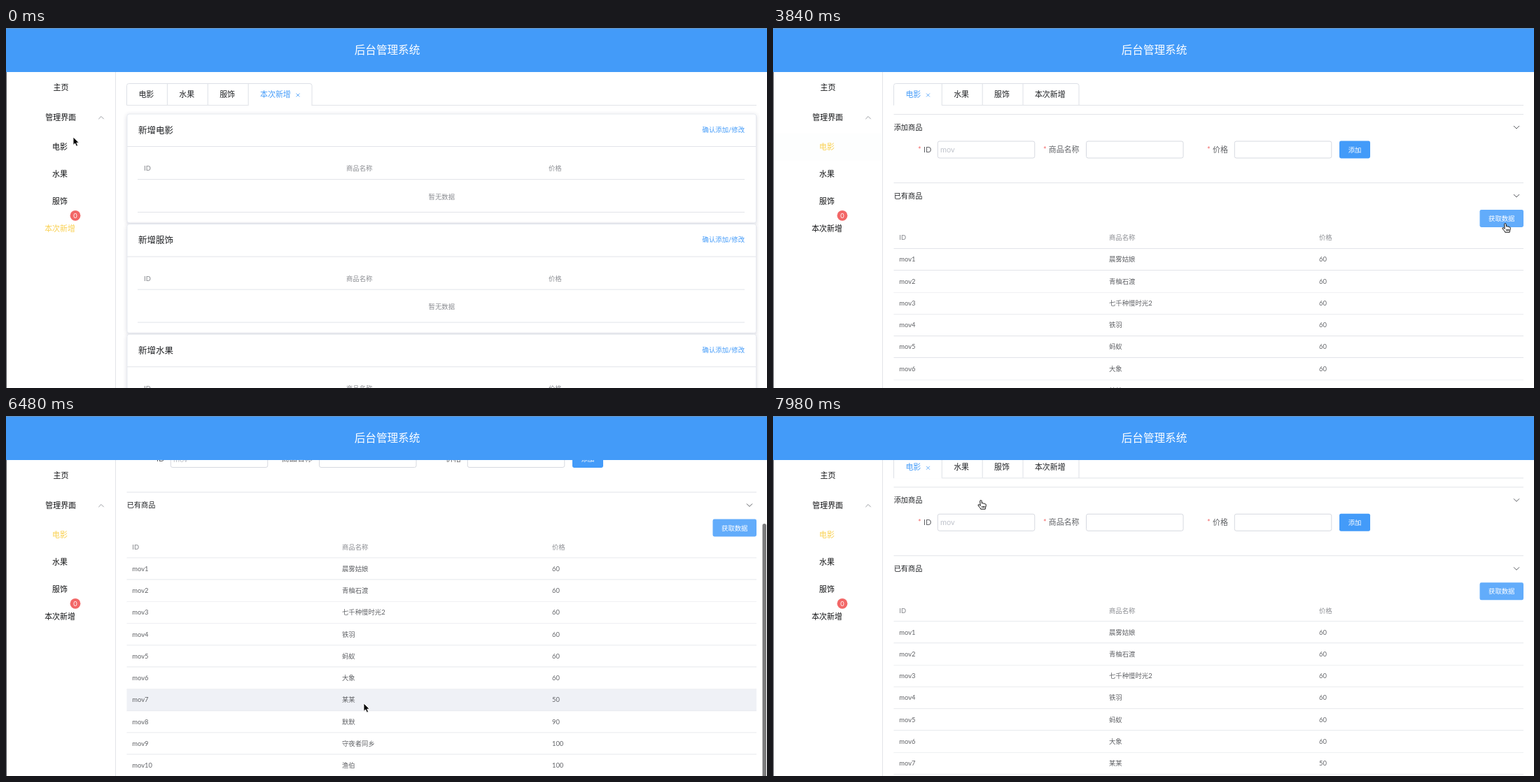
Recreate the animation shown at these times as an HTML page. Size 1087x515 px, loop 8 s.

```html
<!DOCTYPE html>
<html lang="zh-CN">
<head>
<meta charset="utf-8">
<title>后台管理系统</title>
<style>
  html, body { margin: 0; width: 100%; height: 100%; overflow: hidden; background: #fff; }
  svg { display: block; width: 100vw; height: 100vh; }
  text { font-family: Lato, "Noto Sans CJK SC", "Noto Sans CJK", sans-serif; white-space: pre; }
</style>
</head>
<body>
<svg id="stage" viewBox="0 0 1087 515" xmlns="http://www.w3.org/2000/svg"></svg>
<script>
const LOOP = 8000, STEP = 60;
const BLUE = '#439bf9', BLUE_HOVER = '#62acfb', INK = '#1f2124', BODY = '#606266',
      GREY = '#8b8d92', LINE = '#e2e4e9', YELLOW = '#f9d04f', RED = '#f26767';
const SMALL = 9.375, MEDIUM = 10.94;
const ROW_TOP = 315.6, ROW_H = 31.25;
const CLICK_MENU = 600, CLICK_FETCH = 3600, DATA_AT = 3720;

const svg = document.getElementById('stage');

function el(parent, tag, attrs, content) {
  const node = document.createElementNS('http://www.w3.org/2000/svg', tag);
  for (const key in attrs) node.setAttribute(key, attrs[key]);
  if (content !== undefined) node.textContent = content;
  parent.appendChild(node);
  return node;
}
const group = (parent, attrs = {}) => el(parent, 'g', attrs);

// cy is the optical middle of the glyphs
function label(parent, str, x, cy, size, fill, more = {}) {
  return el(parent, 'text', { x, y: cy + size * 0.375, 'font-size': size, fill, ...more }, str);
}
const MID = { 'text-anchor': 'middle' };
const STRONG = { 'font-weight': 500 };

function box(parent, x, y, width, height, fill, more = {}) {
  return el(parent, 'rect', { x, y, width, height, fill, ...more });
}
const rule = (parent, x1, x2, y) => box(parent, x1, y, x2 - x1, 1, LINE);

function stroke(parent, d, color, width = 1) {
  return el(parent, 'path', { d, fill: 'none', stroke: color, 'stroke-width': width });
}

function button(parent, x, y, w, h, str) {
  const face = box(parent, x, y, w, h, BLUE, { rx: 2.4 });
  label(parent, str, x + w / 2, y + h / 2, SMALL, '#fff', { ...MID, ...STRONG });
  return face;
}

function tabs(parent, active) {
  rule(parent, 172.5, 1072, 110);
  let x = 172.5;
  el(parent, 'path', {
    d: 'M172.5 110.5V82.5a3 3 0 0 1 3 -3H434a3 3 0 0 1 3 3V110.5', fill: 'none', stroke: '#dde0e6'
  });
  ['电影', '水果', '服饰', '本次新增'].forEach((name, i) => {
    const on = i === active;
    const w = 36 + name.length * MEDIUM + (on ? 10.9 : 0);
    if (i) stroke(parent, `M${x} 80V110`, '#dde0e6');
    if (on) {
      box(parent, x + 0.5, 109.6, w - 1, 2, '#fff');
      const cx = x + w - 19.8;
      stroke(parent, `M${cx - 2.4} 93.6l4.8 4.8m0 -4.8l-4.8 4.8`, BLUE, 0.8);
    }
    label(parent, name, x + 16.9, 94.5, MEDIUM, on ? BLUE : INK, STRONG);
    x += w;
  });
}

function tableHead(parent, xs, cy) {
  ['ID', '商品名称', '价格'].forEach((name, i) =>
    label(parent, name, xs[i], cy, SMALL, GREY, STRONG));
}

function addedPage(parent) {
  tabs(parent, 3);
  ['新增电影', '新增服饰', '新增水果'].forEach((name, i) => {
    const card = group(parent, { transform: `translate(0 ${i * 157.6})` });
    box(card, 173, 123, 898.5, 156, '#fff',
      { rx: 3, stroke: '#e6e9f0', filter: 'url(#shade)' });
    label(card, name, 189, 146, 12.5, INK);
    label(card, '确认添加/修改', 1055, 145.3, SMALL, BLUE, { 'text-anchor': 'end', ...STRONG });
    rule(card, 173, 1071, 169);
    tableHead(card, [197, 486, 775], 200.5);
    rule(card, 188, 1055, 216);
    label(card, '暂无数据', 622.3, 241, SMALL, GREY, MID);
    rule(card, 188, 1055, 263);
  });
}

function field(parent, star, name, nameX, x) {
  label(parent, '*', star, 174, MEDIUM, RED);
  label(parent, name, nameX, 173.8, MEDIUM, BODY);
  box(parent, x, 162, 138.5, 24, '#fff', { rx: 2.6, stroke: '#d6d9e0' });
}

function section(parent, name, y) {
  rule(parent, 172.5, 1072, y);
  label(parent, name, 172.7, y + 18.9, 10.16, INK, STRONG);
  stroke(parent, `M1058 ${y + 17}l4 4l4 -4`, '#5c5e63');
}

function moviePage(parent) {
  tabs(parent, 0);
  section(parent, '添加商品', 123);
  field(parent, 207, 'ID', 215, 235.3);
  label(parent, 'mov', 239, 174, MEDIUM, '#c0c4cc');
  field(parent, 386, '商品名称', 393.8, 447.5);
  field(parent, 620, '价格', 628, 659.3);
  button(parent, 809, 161.5, 44, 25, '添加');
  section(parent, '已有商品', 221);
  const fetchFace = button(parent, 1009.5, 260, 62.5, 25, '获取数据');
  tableHead(parent, [180.3, 480, 780], 299.7);
  rule(parent, 172.5, 1072, 315);

  const empty = group(parent);
  label(empty, '暂无数据', 622.3, 339.3, SMALL, GREY, MID);
  rule(empty, 172.5, 1072, 362);
  rule(empty, 172.5, 1072, 382);

  const data = group(parent);
  const rows = [
    ['晨雾姑娘', 60], ['青柚石渡', 60], ['七千种慢时光2', 60], ['铁羽', 60], ['蚂蚁', 60],
    ['大象', 60], ['某某', 50], ['默默', 90], ['守夜者同乡', 100], ['渔伯', 100]
  ].map(([name, price], i) => {
    const y = ROW_TOP + i * ROW_H, cy = y + 15.2;
    const back = box(data, 172.5, y + 0.4, 899.5, ROW_H - 0.4, '#fff');
    label(data, 'mov' + (i + 1), 180.3, cy, SMALL, BODY);
    label(data, name, 480, cy, SMALL, BODY);
    label(data, price, 780, cy, SMALL, BODY);
    rule(data, 172.5, 1072, Math.round(y + ROW_H - 0.6));
    return back;
  });
  return { fetchFace, empty, data, rows };
}

function sidebar(parent) {
  box(parent, 0, 63, 156.5, 452, '#fff');
  box(parent, 156, 63, 1, 452, '#e3e4e8');
  const back = box(parent, 1, 150.5, 155, 39, '#ebeff7');
  const item = (name, x, cy) => label(parent, name, x, cy, MEDIUM, '#0f1012', { ...MID, ...STRONG });
  item('主页', 78.5, 85.3);
  item('管理界面', 78.2, 128.2);
  stroke(parent, 'M132.3 130.2l3.7 -3.7l3.7 3.7', '#909399', 0.9);
  const movie = item('电影', 77, 170.2);
  item('水果', 77, 209.3);
  item('服饰', 77, 248.3);
  const added = item('本次新增', 77, 287.3);
  el(parent, 'circle', { cx: 99, cy: 268.3, r: 7.4, fill: RED });
  label(parent, '0', 99, 268.3, SMALL, '#fff', MID);
  box(parent, 0, 63, 1, 452, '#55575c');
  return { back, movie, added };
}

// Keys are [time, value, value...]; eased between neighbours
function track(keys, t) {
  if (t <= keys[0][0]) return keys[0].slice(1);
  for (let i = 1; i < keys.length; i++) {
    const a = keys[i - 1], b = keys[i];
    if (t < b[0]) {
      const p = (t - a[0]) / (b[0] - a[0]), e = p * p * (3 - 2 * p);
      return a.slice(1).map((v, k) => v + (b[k + 1] - v) * e);
    }
  }
  return keys[keys.length - 1].slice(1);
}

const POINTER = [
  [0, 96, 156], [300, 84, 171], [1020, 84, 171], [2220, 667, 287], [3060, 1046, 280],
  [4140, 1046, 280], [4860, 511, 411], [7260, 511, 411], [7860, 297, 121]
];
const SCROLL = [
  [5100, 0], [5340, 50], [5700, 112.5], [6720, 112.5], [6960, 68.8], [7200, 21.7]
];

const defs = el(svg, 'defs');
const shade = el(defs, 'filter', { id: 'shade', x: '-5%', y: '-15%', width: '110%', height: '130%' });
el(shade, 'feDropShadow', { dx: 0, dy: 1.2, stdDeviation: 2.6, 'flood-color': '#4a4f66', 'flood-opacity': 0.22 });

box(svg, 0, 0, 1087, 515, '#fff');
const pageAdded = group(svg), pageMovie = group(svg);
addedPage(pageAdded);
const movie = moviePage(pageMovie);
const thumb = box(svg, 1080.5, 64, 5.5, 379, '#7b7b7c', { rx: 2.75 });
const menu = sidebar(svg);
box(svg, 0, 0, 1087, 63, BLUE);
box(svg, 0, 0, 1087, 1, '#6c95bd');
label(svg, '后台管理系统', 544.5, 31.3, 15.6, '#fff', { ...MID, 'font-weight': 300 });

const pointer = group(svg);
const arrow = el(pointer, 'path', {
  d: 'M0 0V11.4L2.6 9L4.5 13.2L6.6 12.3L4.8 8.2H8.3Z',
  fill: '#000', stroke: '#fff', 'stroke-width': 0.9, 'stroke-linejoin': 'round'
});
const hand = el(pointer, 'path', {
  d: 'M-1.3 .6C-1.3 -.8 1 -.8 1.1 .6L1.5 4C2 3.2 3.4 3.4 3.6 4.4C4.3 3.7 5.4 4 5.6 5' +
     'C6.5 4.6 7.3 5.2 7.3 6.2C7.3 8.6 6.4 9.6 6.2 12.2H-.3C-.7 10.4 -3.2 8.4 -4 6.8' +
     'C-4.3 5.6 -2.9 5.2 -2 6.2L-.8 7.4ZM1.7 8V10.2M3.4 8V10.2M5 8V10.2',
  fill: '#fff', stroke: '#000', 'stroke-width': 0.95, 'stroke-linejoin': 'round'
});

const show = (node, on) => node.setAttribute('visibility', on ? 'inherit' : 'hidden');
const ramp = (t, from, span) => Math.min(1, Math.max(0, (t - from) / span));

function draw(t) {
  const [x, y] = track(POINTER, t), [scroll] = track(SCROLL, t);
  const onMovie = t >= CLICK_MENU, loaded = t >= DATA_AT;

  show(pageAdded, !onMovie);
  show(pageMovie, onMovie);
  show(movie.empty, onMovie && !loaded);
  movie.empty.style.display = loaded ? 'none' : '';
  movie.data.style.display = loaded ? '' : 'none';
  pageMovie.setAttribute('transform', `translate(0 ${-scroll})`);

  menu.movie.setAttribute('fill', onMovie ? YELLOW : '#0f1012');
  menu.added.setAttribute('fill', onMovie ? '#0f1012' : YELLOW);
  menu.back.setAttribute('opacity', ramp(t, 0, 240) * (1 - ramp(t, CLICK_FETCH, 270)));

  const overFetch = t >= 2940 && t < 4260;
  movie.fetchFace.setAttribute('fill', overFetch || t >= CLICK_FETCH ? BLUE_HOVER : BLUE);

  // the hovered row only refreshes once scrolling has settled
  const settled = t < 5760 ? 0 : t < 7260 ? 112.5 : scroll;
  const hovered = x > 173 && x < 1072 ? Math.floor((y + settled - ROW_TOP) / ROW_H) : -1;
  movie.rows.forEach((row, i) => row.setAttribute('fill', i === hovered ? '#eff1f6' : '#fff'));

  thumb.setAttribute('y', 64 + scroll * 0.8);
  thumb.setAttribute('opacity', t < 5100 ? 0 : 1 - ramp(t, 7560, 300));

  const link = (t >= 60 && t < 1200) || overFetch || t >= 7800;
  show(hand, link);
  show(arrow, !link);
  pointer.setAttribute('transform', `translate(${x} ${y})`);
}

const start = performance.now();
function tick() {
  const t = (performance.now() - start) % LOOP;
  draw(Math.floor(t / STEP) * STEP);
  requestAnimationFrame(tick);
}
tick();
</script>
</body>
</html>
```
